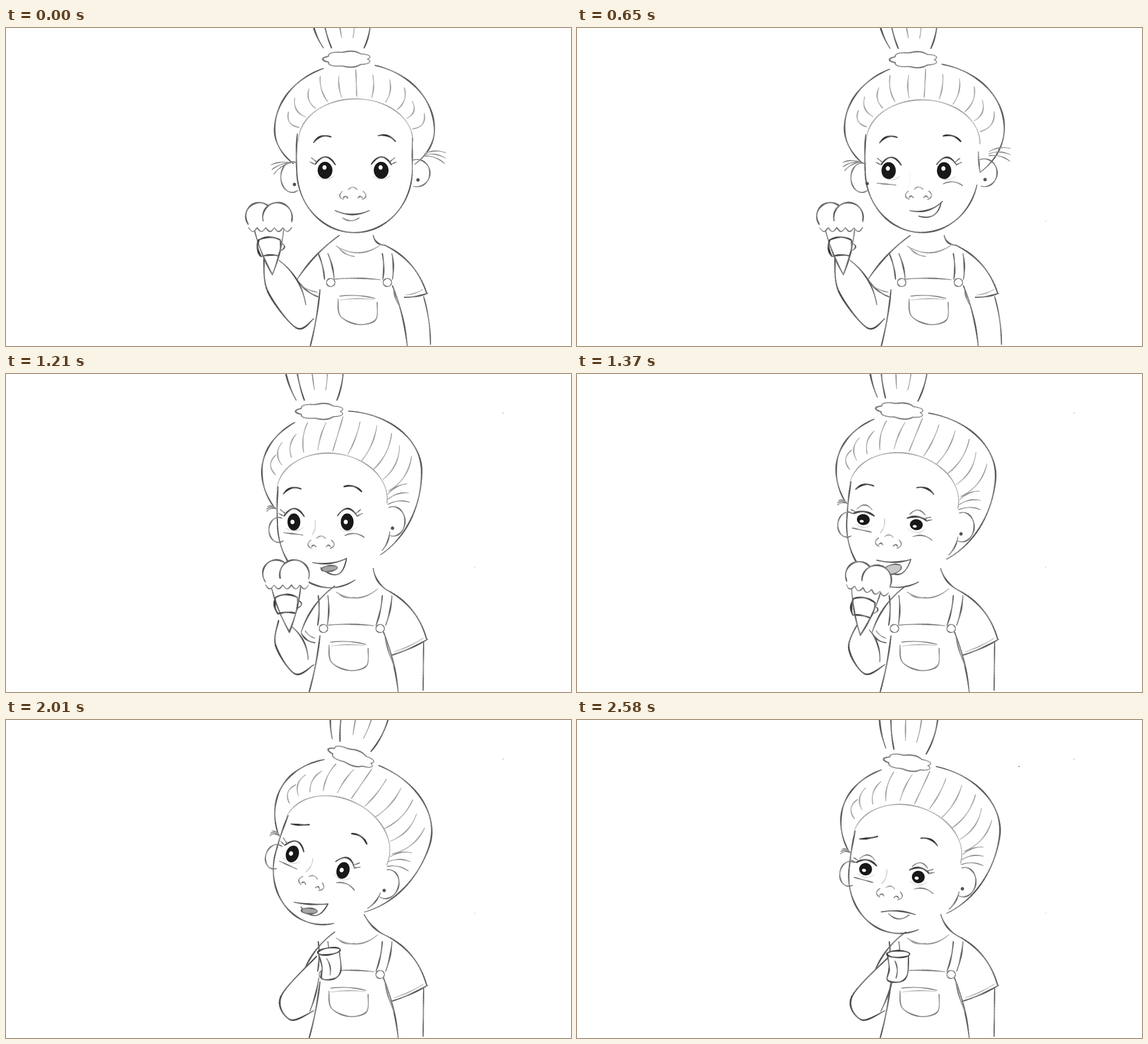
Animation of 997x561 px, one loop 2910 ms. Source, as an HTML page with a canvas:

```html
<!DOCTYPE html>
<html lang="en">
<head>
<meta charset="utf-8">
<title>Ice cream sketch</title>
<style>
  html, body { margin: 0; width: 100%; height: 100%; overflow: hidden; background: #fff; }
  canvas { display: block; }
</style>
</head>
<body>
<canvas id="stage" width="997" height="561"></canvas>
<script>
const ctx = document.getElementById('stage').getContext('2d');
const LOOP = 2910, STEP = 80;
const clamp = x => Math.max(0, Math.min(1, x));
const mix = (a, b, k) => a + (b - a) * k;
const span = (n, f) => Array.from({ length: n + 1 }, (_, i) => f(i / n));

// Value at a fractional position among the seven key poses
function key(pos, ...values) {
  const i = Math.min(Math.floor(pos), values.length - 2);
  return mix(values[i], values[i + 1], pos - i);
}

// Bowed line; a positive bend sags below a line running left to right
function bow(x1, y1, x2, y2, bend = 0) {
  const len = Math.hypot(x2 - x1, y2 - y1) || 1;
  return span(16, u => {
    const b = 4 * u * (1 - u) * bend / len;
    return [mix(x1, x2, u) + (y1 - y2) * b, mix(y1, y2, u) + (x2 - x1) * b];
  });
}

// Elliptic arc in degrees; the lower half may have its own height
function arc(cx, cy, rx, ry, from = 0, to = 360, tilt = 0, low = ry) {
  const c = Math.cos(tilt), s = Math.sin(tilt);
  return span(44, u => {
    const a = mix(from, to, u) * Math.PI / 180;
    const x = rx * Math.cos(a), y = (Math.sin(a) < 0 ? ry : low) * Math.sin(a);
    return [cx + x * c - y * s, cy + x * s + y * c];
  });
}

// Smooth curve through points
function through(...p) {
  const at = i => p[Math.max(0, Math.min(p.length - 1, i))];
  return p.slice(1).flatMap((_, i) => span(10, u => [0, 1].map(j => {
    const [a, b, c, d] = [-1, 0, 1, 2].map(o => at(i + o)[j]);
    return b + .5 * u * (c - a + u * (2 * a - 5 * b + 4 * c - d + u * (3 * (b - c) + d - a)));
  })));
}

// Pencil stroke: tapered, with uneven pressure
let strokes = 0;
function pen(p, width = 2.9, shade = .64) {
  const id = ++strokes;
  ctx.lineCap = 'round';
  for (let i = 1; i < p.length; i++) {
    const press = .88 + .12 * Math.sin(i * .5 + id * 2.4);
    const taper = .62 + .38 * Math.sqrt(Math.sin(Math.PI * i / p.length));
    const g = Math.round(255 * (1 - clamp(shade * press)));
    ctx.strokeStyle = `rgb(${g},${g},${g})`;
    ctx.lineWidth = width * taper * press;
    ctx.beginPath();
    ctx.moveTo(...p[i - 1]);
    ctx.lineTo(...p[i]);
    ctx.stroke();
  }
}

function fill(p, color = '#fff') {
  ctx.fillStyle = color;
  ctx.beginPath();
  p.forEach(q => ctx.lineTo(...q));
  ctx.fill();
}

function shape(p, width, shade, color) {
  fill(p, color);
  pen(p, width, shade);
}

function within(x, y, angle, paint) {
  ctx.save();
  ctx.translate(x, y);
  ctx.rotate(angle);
  paint();
  ctx.restore();
}

function drawShoulders(turn, act) {
  const m = (a, b) => mix(a, b, turn), neck = key(act, 648, 648, 648, 648, 632, 632, 642);
  pen(bow(m(588, 580), m(366, 374), m(514, 521), m(443, 455), m(5, 8)));
  pen(bow(m(513, 521), m(443, 457), m(550, 545), 474, 4));
  pen(bow(m(519, 528), 453, m(549, 545), 466, 2), 2, .42);
  pen(bow(neck, m(366, 343), m(668, 672), m(383, 381), 5));
  pen(bow(m(668, 672), m(383, 381), 742, 467, -12));
  pen(bow(m(703, 681), m(475, 496), 744, 468, 2));
  pen(bow(m(705, 685), m(471, 490), 736, m(461, 466), 2), 1.8, .35);
  pen(bow(737, 474, m(749, 736), 558, m(-3, 0)), 2.6, .58);
  pen(bow(583, 385, m(662, 656), m(382, 379), 13), 2.3, .42);
  pen(bow(588, 389, 615, m(403, 394), 3), 2.2, .42);
}

function drawDungarees(turn) {
  const shift = -16 * turn;
  pen(bow(554, 462, mix(537, 535, turn), 561, -2));
  pen(bow(682 + shift, 455, 708 + shift, 561, -4));
  pen(bow(684 + shift, 460, 693 + shift * .5, mix(488, 515, turn), 2), 2.2, .5);
  for (const side of [0, 1]) {
    for (const edge of [0, 17])
      pen(bow(551 + side * 113 + edge, mix(398, 391, turn), 562 + side * 103 + edge + shift * .75, 443, -2), 2.8, .62);
    pen(arc(573 + side * 100 + shift * .8, 449, 7.5, 7), 2, .52);
  }
  pen(bow(580 + shift * .7, 443, 660 + shift * .7, 444, -2), 2.4, .52);
  const left = 586 + shift, right = 655 + shift;
  pen(through([left, 478], [left + 4, 508], [left + 35, 523], [right - 3, 515], [right, 484]), 2.4, .5);
  pen(bow(left + 3, 473, right - 4, 477, -3), 2.2, .46);
  pen(bow(left + 4, 480, right - 6, 479, -2), 1.8, .32);
}

function drawArm(act) {
  const reach = key(act, 0, 0, .4, .6, 1, 1, 1), bent = reach ** 3;
  const x = key(act, 455, 455, 470, 481, 526, 548, 555), y = key(act, 408, 408, 425, 435, 432, 417, 413);
  const outer = through([x, y], [mix(462, 485, reach), mix(465, 488, reach)], [mix(512, 502, bent), 529], [543, 513]);
  const inner = bow(x + mix(27, 4, bent), y + mix(2, 38, bent), mix(529, 536, reach), mix(488, 514, reach), -7 * (1 - bent) - 2);
  fill([...outer, ...inner.slice().reverse()]);
  pen(outer, 3.1, .7);
  pen(inner, 2.7, .66);
}

function drawHair(turn) {
  const m = (a, b) => mix(a, b, turn);
  const x = m(615, 592.5), y = m(180, 172), rise = m(118, 107);
  const lineX = m(617, 575), lineY = m(200, 215), tilt = .13 * turn;
  pen(arc(x, y, 141, rise, m(247, 234), m(140, 147), 0, m(92, 118)));
  pen(arc(x, y, 141, rise, m(-75, -85), m(41, 61), 0, m(92, 168)));
  pen(arc(lineX, lineY, m(101, 98), 75, 180, 360, tilt), 2.2, .36);

  // Strands combed from the hairline to the crown
  for (let i = 0; i < 11; i++) {
    const a = (198 + i * 14.6) * Math.PI / 180, c = Math.cos(a), s = Math.sin(a);
    const tip = .87 + .04 * Math.sin(i * 2.7);
    pen(bow(x + 141 * tip * c, y + rise * tip * s, lineX + 105 * c, lineY + 80 * s + 105 * c * tilt, -9 * c), 2.3, .36);
  }

  // Wisps at the temples
  for (let i = 0; i < 3; i++) {
    const left = m(3.1, 3.5) - i * .25, right = m(-.05, -.5) + i * .2;
    const reach = m(34, 17), lx = m(502, 477), rx = m(738, 674), ry = m(222, 212) + i * m(2, 9);
    pen(bow(lx, 238, lx + reach * Math.cos(left), 240 + reach * Math.sin(left), 3), 1.9, .5);
    pen(bow(rx, ry, rx + 38 * Math.cos(right), ry + 38 * Math.sin(right), -4), 2, .45);
  }

  // Top knot and its band
  const knot = m(602, 554), knotY = m(55, 66);
  for (const u of [-1, -.6, -.1, .45, 1]) {
    const edge = Math.abs(u) > .5;
    pen(bow(knot - 12 + 52 * u, -32, knot - 6 + 36 * u, knotY - (edge ? 20 : 38), -5 * u), edge ? 2.9 : 2.2, edge ? .66 : .4);
  }
  const band = arc(0, 0, 36, 12).map(([a, b], i) => {
    const puff = 1 + .2 * Math.abs(Math.sin(i / 44 * Math.PI * 7));
    return [knot + a * puff, knotY + b * puff];
  });
  pen(band, 2.6, .52);
}

function drawEye(x, y, side, turn, lid, gaze) {
  const open = 1 - lid;
  within(x, y, 0, () => {
    if (lid < .9) {
      fill(arc(gaze, lid * 6, mix(13, 11.3, turn), 15 * (1 - lid * .9)), '#181818');
      fill(arc(gaze - mix(1, 2.5, turn), mix(-5, 0, turn) + lid * 14, 3.6, 4 * open), '#fff');
    }
    pen(bow(-17, mix(-11, -2, lid), 18, mix(-10, 0, lid), mix(-13, 7, lid)), 3 + 1.6 * lid, .76);
    if (lid > .1) pen(bow(-13, -15, 14, -16, -8), 2.2, .5);
    for (const k of [0, 1])
      pen(bow(side * (17 - 3 * k), -10 * open - 4 * k, side * (27 - 3 * k), -15 * open - 7 * k * open), 1.8, .55);
    if (lid < .5) pen(bow(-14, 11, 17, 9, 6), 1.3, .2);
  });
}

function drawFace(turn, act) {
  const m = (a, b) => mix(a, b, turn);
  const jaw = key(act, 0, 0, 0, 1, 1, 0, 0), sad = key(act, 0, 0, 0, 0, .2, 1, 1);
  const lid = key(act, 0, 0, 0, 0, 1, 0, .3), gaze = key(act, 0, -4, 0, 0, 0, 0, 0);
  const x = m(615, 572), y = m(250, 262), rx = m(102, 93);
  pen(arc(x, y, rx, m(111, 105 + 10 * jaw), m(0, 62), 180));
  pen(bow(x - rx, y, x - rx + 1, y - 63, -1));
  pen(bow(m(717, 677), m(250, 278), m(717, 664), m(194, 311), m(0, -3)), 2.6, .56);

  // Ears and earrings
  pen(arc(m(505, 481), m(263, 275), m(20, 17), m(27, 22), 290, 60), 2.5, .52);
  pen(arc(m(725, 683), m(256, 260), m(23, 21), m(24, 26), -110, 105), 2.5, .56);
  fill(arc(m(727, 682), m(268, 272), 3, 3), '#555');
  if (turn < .5) fill(arc(509, 276, 3, 3), '#555');

  for (const side of [-1, 1]) {
    const left = side < 0;
    const bx = left ? m(558, 505) : m(672, 612), by = left ? m(197, 207) : m(195, 203) - 4 * sad;
    within(bx, by, side * m(.32, .28), () => pen(bow(-16, 0, 16, 0, (left ? mix(-6, 1, sad) : -5)), 3.3, .8));
    drawEye(left ? m(563, 508) : m(662, 602), m(251, 261), side, turn, lid, gaze);
    const cheek = left ? m(552, 506) : m(672, 614);
    if (turn) pen(bow(cheek - 16, m(274, left ? 280 : 285), cheek + 18, m(277, left ? 284 : 288), left ? 0 : -5), 2.3, .52 * clamp(turn * 4));
  }

  // Nose
  const nx = m(612, 556), ny = m(294, 299);
  for (const side of [-1, 1]) {
    pen(bow(nx + side * 18, ny - 6, nx + side * 16, ny + 9, side * -6), 2.1, .44);
    pen(bow(nx + side * 13 - 4, ny + 6, nx + side * 13 + 4, ny + 6, -3), 2.3, .52);
  }
  pen(bow(nx - 8, ny - 9, nx + 8, ny - 9, -4), 2, .38);
  if (turn) pen(bow(m(594, 545), 258, m(592, 540), 284, -3), 1.6, .24 * turn);
}

function drawMouth(act) {
  const x = key(act, 611, 616, 588, 571, 541, 538, 567), y = key(act, 322, 314, 320, 329, 326, 323, 341);
  const tilt = key(act, 0, -.27, -.3, -.12, .13, .05, .08), smile = key(act, 7, 8, 4, 5, 3, 2, -4);
  const open = key(act, 0, .4, .4, 1, 1, .8, .2), out = key(act, 0, 0, 0, 0, 1, 0, 0);
  const corner = clamp(open * 2), gap = 6 + smile;
  within(x, y, tilt, () => {
    pen(bow(-30, 0, 30, 0, smile), 2.9, .68);
    pen(bow(-17 - 6 * out, gap, mix(12, 30, corner), mix(gap, 0, corner), 5 + 16 * open), 2.5, mix(.45, .68, corner));
    if (open > .6) {
      const g = Math.round(mix(165, 255, out));
      shape(arc(mix(-2, -7, out), mix(14, 22, out), mix(14, 23, out), mix(5, 13, out), 0, 360, -.7 * out), 2.5, .62, `rgb(${g},${g},${g})`);
      if (out > .5) pen(bow(-10, 22, 6, 12, 3), 1.9, .45);
    }
  });
}

function drawCone(act) {
  const x = 464 + key(act, 0, 0, 26, 30, 70, 70), y = 355 + key(act, 0, 0, 13, 20, 35, 35);
  within(x, y, key(act, 0, 0, 0, 0, .5, .5), () => {
    shape([...bow(-26, 0, 6, 80, 3), ...bow(6, 80, 26, 0, 3)], 2.9, .6);
    for (const [cx, cy, r] of [[-17, -23, 24], [15, -21, 26]]) shape(arc(cx, cy, r, r, 120, 395), 3, .62);
    const drips = span(48, u => [mix(-36, 40, u), -3 + 7 * Math.abs(Math.sin(u * Math.PI * 5))]);
    fill([[40, -14], [-36, -14], ...drips]);
    pen(drips, 2.3, .52);

    // Hand wrapped around the cone
    pen(bow(-18, 19, 20, 19, -5), 3.3, .72);
    pen(bow(-18, 19, -14, 48, 4), 3.9, .78);
    pen(bow(-14, 48, 17, 47, -2), 3.2, .7);
    pen(bow(20, 19, 17, 47, -2), 2.8, .65);
    pen(bow(20, 24, 21, 38, -7), 2.4, .6);
  });
}

function drawCup(act) {
  const p = Math.max(0, act - 4);
  within(key(p, 561, 570, 567), key(p, 391, 408, 413), key(p, -.4, -.14, 0), () => {
    shape(through([-19, 2], [-16, 26], [-19, 46], [3, 49], [16, 36], [18, 2]), 2.8, .68);
    shape(arc(0, 0, 20, 6), 3, .76);
    pen(bow(-6, 12, -4, 42, -3), 2.4, .6);
  });
}

function drawBlob(x, y) {
  const p = arc(0, 0, 19, 43, -90, 270, -.15).map(([a, b]) => [x + a * (1 - b / 130), y + b]);
  shape(p, 3, .7);
}

function draw(t) {
  const starts = [90, 650, 970, 1210, 1610, 2100], ends = [650, 970, 1210, 1610, 2010, 2580];
  const position = stops => starts.reduce((sum, s, i) => sum + clamp((t - s) / (stops[i] - s)), 0);
  // The head settles earlier than the arm and the features
  const act = position(ends), look = position(ends.with(4, 1770));
  const turn = key(look, 0, .22, 1, 1, 1, 1, 1), bodyTurn = key(act, 0, 0, .5, 1, 1, 1, 1);

  strokes = 0;
  ctx.fillStyle = '#fff';
  ctx.fillRect(0, 0, 997, 561);
  drawShoulders(bodyTurn, act);
  drawArm(act);
  drawDungarees(bodyTurn);

  const headX = 565 + key(look, 0, 3, 14.5, 0, -2, 1, 4), headY = 240 + key(look, 0, -1.5, -7, 0, -2.5, -6, 9);
  within(headX, headY, key(look, 0, 0, 0, 0, .24, .315, .147), () => {
    ctx.translate(-565, -240);
    drawHair(turn);
    drawFace(turn, act);
  });
  drawMouth(act);

  if (t <= 1450) drawCone(act);
  else {
    const fall = ((t - 1450) / STEP) ** 2 - 4;
    drawCup(act);
    drawBlob(521, 421 + 14 * fall);
    drawBlob(489, 530 + 40 * fall);
  }

  // Paper specks
  if (t >= 650) fill(arc(827, 341, .9, .9), '#ccc');
  if (t >= 970) fill(arc(877, 69, 1, .8), '#aaa');
  if (t >= 2580) fill(arc(780, 82, 1.2, 1), '#888');
}

// Drawn on a stepped clock, with longer holds at the start, at 2010 and at the end
function stepped(t) {
  if (t < 170) return 0;
  const [from, last] = t < 2180 ? [170, 2010] : [2180, 2580];
  return Math.min(last, from + STEP * Math.floor((t - from) / STEP));
}

let shown = -1;
function tick() {
  const t = stepped(performance.now() % LOOP);
  if (t !== shown) draw(shown = t);
  requestAnimationFrame(tick);
}
tick();
</script>
</body>
</html>
```
